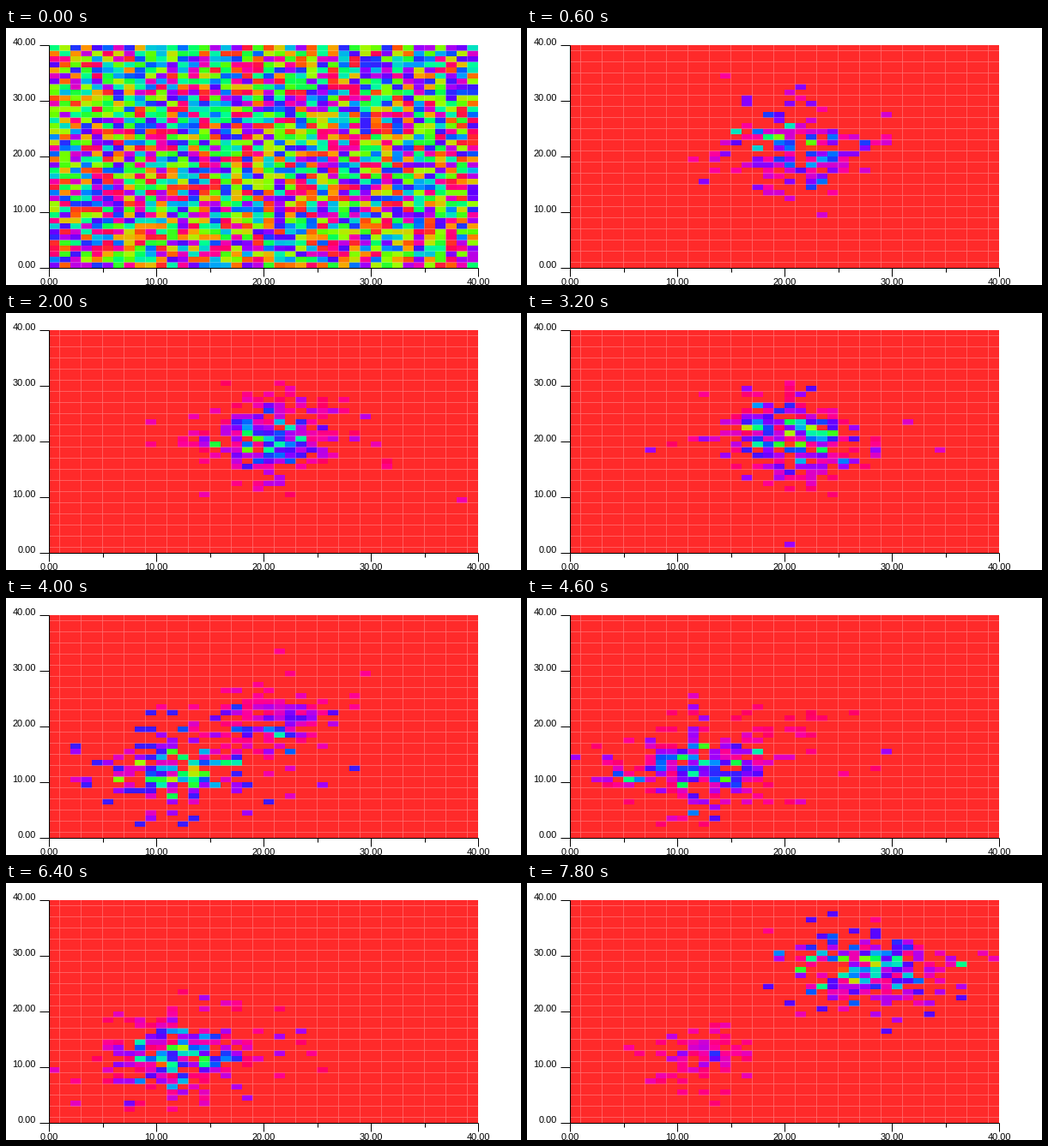
Write a matplotlib script that moves like this. It is 600 by 300 pixels and loops after 8 s.

```python
import math

import matplotlib.pyplot as plt
import numpy as np
from matplotlib.animation import FuncAnimation
from matplotlib.colors import ListedColormap
from matplotlib.lines import Line2D

W, H, DPI = 600, 300, 100
LEFT, RIGHT, TOP, BOTTOM = 50, 550, 20, 280
CELLS = 40
FRAMES, STEP = 40, 200

CENTERS = [(20.8, 20.8), (12, 12), (28, 28)]
HOLD = 18        # steps spent at each center
HITS = 52        # new samples per step
SPREAD = 2.1
DECAY = 0.69
FLOOR = 0.25     # weaker traces vanish


def hue_map(n=256):
    """Red, magenta, blue, cyan, green, yellow, red as clipped cosines."""
    angle = -2 * np.pi * np.linspace(0, 1, n)[:, None]
    shift = np.radians([0, 120, 240])
    return ListedColormap(np.clip(0.4925 + 0.655 * np.cos(angle - shift), 0, 1))


def build_fields():
    """Random noise first, then a fading histogram of a jumping cloud."""
    rng = np.random.default_rng(12)
    fields = [rng.random((CELLS, CELLS))]
    heat = np.zeros((CELLS, CELLS))
    for step in range(1, FRAMES):
        cx, cy = CENTERS[step // HOLD]
        x = rng.logistic(cx, SPREAD, HITS)
        y = rng.logistic(cy, SPREAD, HITS)
        hits, _, _ = np.histogram2d(y, x, bins=CELLS,
                                    range=[[0, CELLS], [0, CELLS]])
        heat = heat * DECAY + hits
        heat[heat < FLOOR] = 0
        fields.append(heat / heat.max())
    return fields


fig = plt.figure(figsize=(W / DPI, H / DPI), dpi=DPI, facecolor="white")
ax = fig.add_axes([LEFT / W, 1 - BOTTOM / H,
                   (RIGHT - LEFT) / W, (BOTTOM - TOP) / H])
ax.axis("off")

fields = build_fields()
edges = np.arange(CELLS + 1)
mesh = ax.pcolormesh(edges, edges, fields[0], cmap=hue_map(), vmin=0, vmax=1,
                     antialiased=True, linewidth=0, snap=False)
ax.set_xlim(0, CELLS)
ax.set_ylim(0, CELLS)


def line(x0, y0, x1, y1):
    fig.add_artist(Line2D([(x0 - 0.5) / W, (x1 - 0.5) / W],
                          [1 - (y0 - 0.5) / H, 1 - (y1 - 0.5) / H],
                          color="black", linewidth=72 / DPI,
                          solid_capstyle="butt"))


def label(x, y, value, align):
    fig.text(x / W, 1 - y / H, f"{value:.2f}", ha=align, va="baseline",
             family="Liberation Sans", fontsize=11 * 72 / DPI, color="black")


line(LEFT, TOP, LEFT, BOTTOM)
line(LEFT, BOTTOM, RIGHT, BOTTOM)
for value in range(0, CELLS + 1, 10):
    x = LEFT + value * (RIGHT - LEFT) / CELLS
    y = BOTTOM - value * (BOTTOM - TOP) / CELLS
    line(LEFT - 10, y, LEFT, y)
    line(x, BOTTOM, x, BOTTOM + 10)
    label(LEFT - 15, y, value, "right")
    label(x, BOTTOM + 20, value, "center")
for value in range(5, CELLS, 10):
    x = LEFT + math.ceil(value * (RIGHT - LEFT) / CELLS)
    line(x, BOTTOM, x, BOTTOM + 5)


def draw(i):
    mesh.set_array(fields[i])
    return (mesh,)


anim = FuncAnimation(fig, draw, frames=FRAMES, interval=STEP,
                     repeat=True, repeat_delay=0, blit=False)
plt.show()
```
